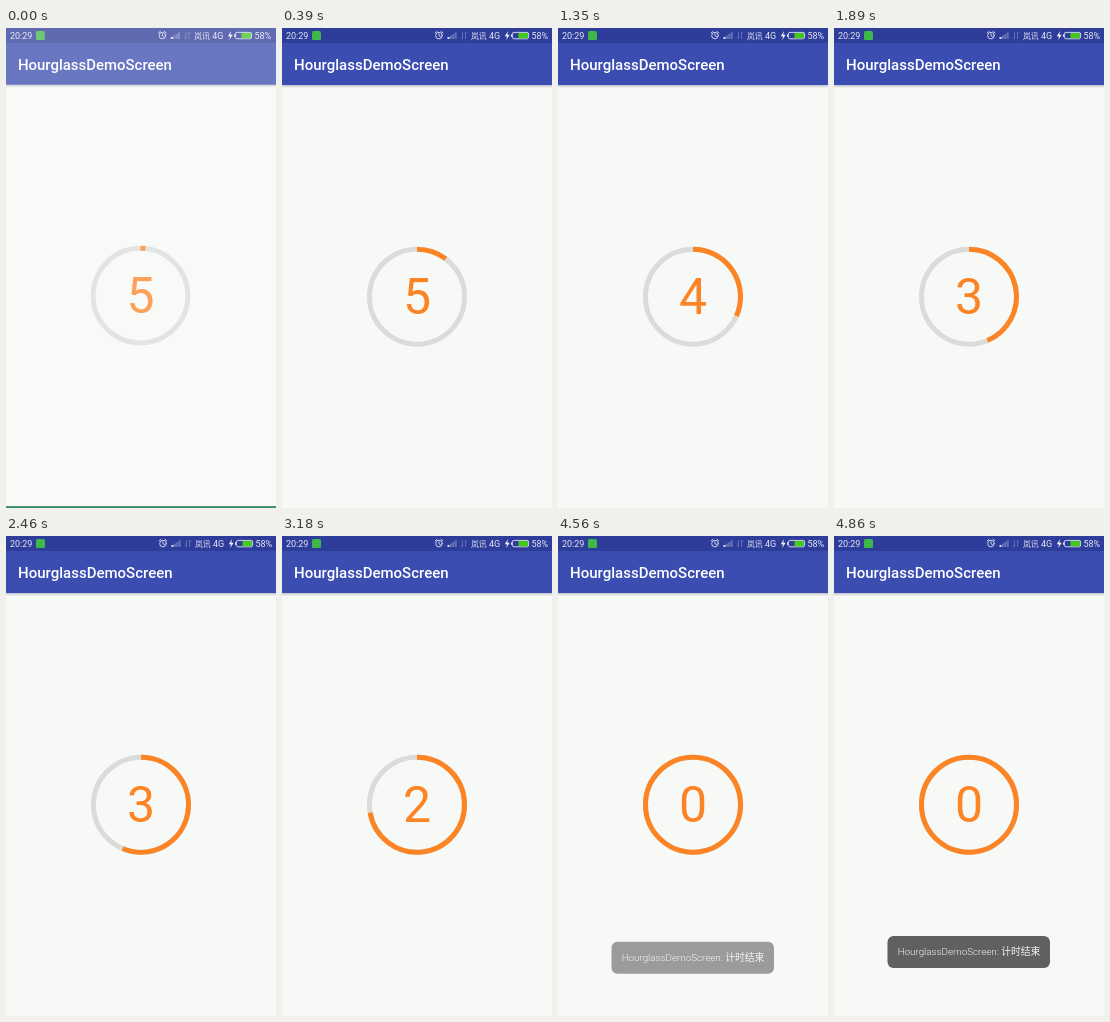
Recreate the animation shown at these times as an HTML page. Size 270 by 480 pixels, loop 5.97 s.

```html
<!DOCTYPE html>
<html lang="zh">
<head>
<meta charset="utf-8">
<title>Countdown</title>
<style>
  html, body { margin: 0; width: 100%; height: 100%; overflow: hidden; background: #f7f9f7; }
  svg { display: block; width: 100vw; height: 100vh; }
  text { font-family: Roboto, "Noto Sans CJK SC", "Noto Sans CJK", sans-serif; }
  .status { font-size: 9px; fill: #e4e7f6; }
  .carrier { font-size: 7.8px; }
  .title { font-size: 15px; font-weight: 500; fill: #fff; }
  .digit { font-size: 50px; fill: #fc8424; text-anchor: middle; }
  .note { font-size: 9.8px; font-weight: 300; fill: #f4f4f4; text-anchor: middle; }
</style>
</head>
<body>
<svg viewBox="0 0 270 480">
  <defs>
    <linearGradient id="shade" x2="0" y2="1">
      <stop offset="0" stop-color="#bfc2c6"/>
      <stop offset="1" stop-color="#f7f9f7"/>
    </linearGradient>
  </defs>
  <rect width="270" height="480" fill="#3f8a70"/>
  <g id="screen">
    <!-- a little wider than the stage, so that scaling leaves no gap at the right -->
    <rect width="272" height="480" fill="#f7f9f7"/>
    <rect y="57" width="272" height="3" fill="url(#shade)"/>
    <rect width="272" height="57" fill="#3b4db0"/>
    <rect width="272" height="15" fill="#2f3d9a"/>

    <!-- status bar -->
    <g class="status">
      <text x="4" y="11">20:29</text>
      <text class="carrier" x="189" y="10.6">岚讯</text>
      <text x="207" y="11">4G</text>
      <text x="249.5" y="11">58%</text>
    </g>
    <rect x="30" y="3" width="9" height="9" rx="1.5" fill="#3fb84a"/>
    <g fill="none" stroke="#dde1f4" stroke-width=".9" stroke-linecap="round">
      <circle cx="157" cy="7.6" r="3.3"/>
      <path d="M157 5.8V7.8L158.5 8.6M153.2 4.8L155 3.4M160.8 4.8L159 3.4"/>
    </g>
    <g id="signal"></g>
    <path d="M180.5 4V11L179 9.4M183.5 11V4L185 5.6" fill="none" stroke="#6672ba" stroke-width=".9"/>
    <path d="M226 3L222.8 8.2H225L224.2 12L227.6 6.8H225.3Z" fill="#f2f4fb"/>
    <rect x="230.4" y="4.4" width="16.2" height="6.4" rx="1.6" fill="none" stroke="#dde1f4" stroke-width=".9"/>
    <rect x="229" y="6.3" width="1" height="2.6" fill="#dde1f4"/>
    <rect x="236.4" y="5" width="9.6" height="5.2" rx=".8" fill="#45c81e"/>

    <text class="title" x="12" y="42.2">HourglassDemoScreen</text>

    <!-- countdown -->
    <g fill="none" stroke-width="5">
      <circle cx="135" cy="268.7" r="47.5" stroke="#dadcda"/>
      <path id="arc" stroke="#fc8424"/>
    </g>
    <text id="digit" class="digit" x="135" y="286.2">5</text>

    <g id="toast">
      <rect x="53.5" y="400" width="162.5" height="32" rx="6" fill="#5f615f"/>
      <text class="note" x="135" y="419.4">HourglassDemoScreen: 计时结束</text>
    </g>
    <rect id="veil" width="272" height="480" fill="#f9faf8"/>
  </g>
</svg>
<script>
  const LOOP = 5970, STEP = 30;
  const COUNT = 5, SECOND = 900, LEAD = 75;
  const TOAST_AT = 4440, TOAST_TIME = 320;
  const OPEN_TIME = 180;
  const CX = 135, CY = 268.7, R = 47.5;

  const $ = id => document.getElementById(id);
  const clamp = v => Math.max(0, Math.min(1, v));

  $('signal').innerHTML = [2, 3.4, 5, 6.6].map((h, i) =>
    `<rect x="${165.5 + i * 2.4}" y="${11 - h}" width="2" height="${h}" fill="${i ? '#6672ba' : '#dde1f4'}"/>`
  ).join('');

  function arcPath(turn) {
    if (turn >= 1) {
      return `M${CX} ${CY - R}a${R} ${R} 0 1 1 0 ${2 * R}a${R} ${R} 0 1 1 0 ${-2 * R}Z`;
    }
    const a = turn * 2 * Math.PI;
    const x = CX + R * Math.sin(a), y = CY - R * Math.cos(a);
    return `M${CX} ${CY - R}A${R} ${R} 0 ${turn > .5 ? 1 : 0} 1 ${x} ${y}`;
  }

  function render(t) {
    const passed = (t + LEAD) / SECOND;
    $('arc').setAttribute('d', arcPath(clamp(passed / COUNT)));
    $('digit').textContent = Math.max(0, Math.ceil(COUNT - passed));

    // toast rises while it fades in, slowing down
    const left = (1 - clamp((t - TOAST_AT) / TOAST_TIME)) ** 2;
    $('toast').setAttribute('opacity', 1 - left);
    $('toast').setAttribute('transform', `translate(0 ${15 * left})`);

    // window settles as it opens
    const open = 1 - clamp(t / OPEN_TIME);
    $('screen').setAttribute('transform', `scale(${1 - .004 * open})`);
    $('veil').setAttribute('opacity', .24 * open);
  }

  const start = performance.now();
  function tick() {
    const t = (performance.now() - start) % LOOP;
    render(Math.floor(t / STEP) * STEP);
    requestAnimationFrame(tick);
  }
  render(0);
  requestAnimationFrame(tick);
</script>
</body>
</html>
```
